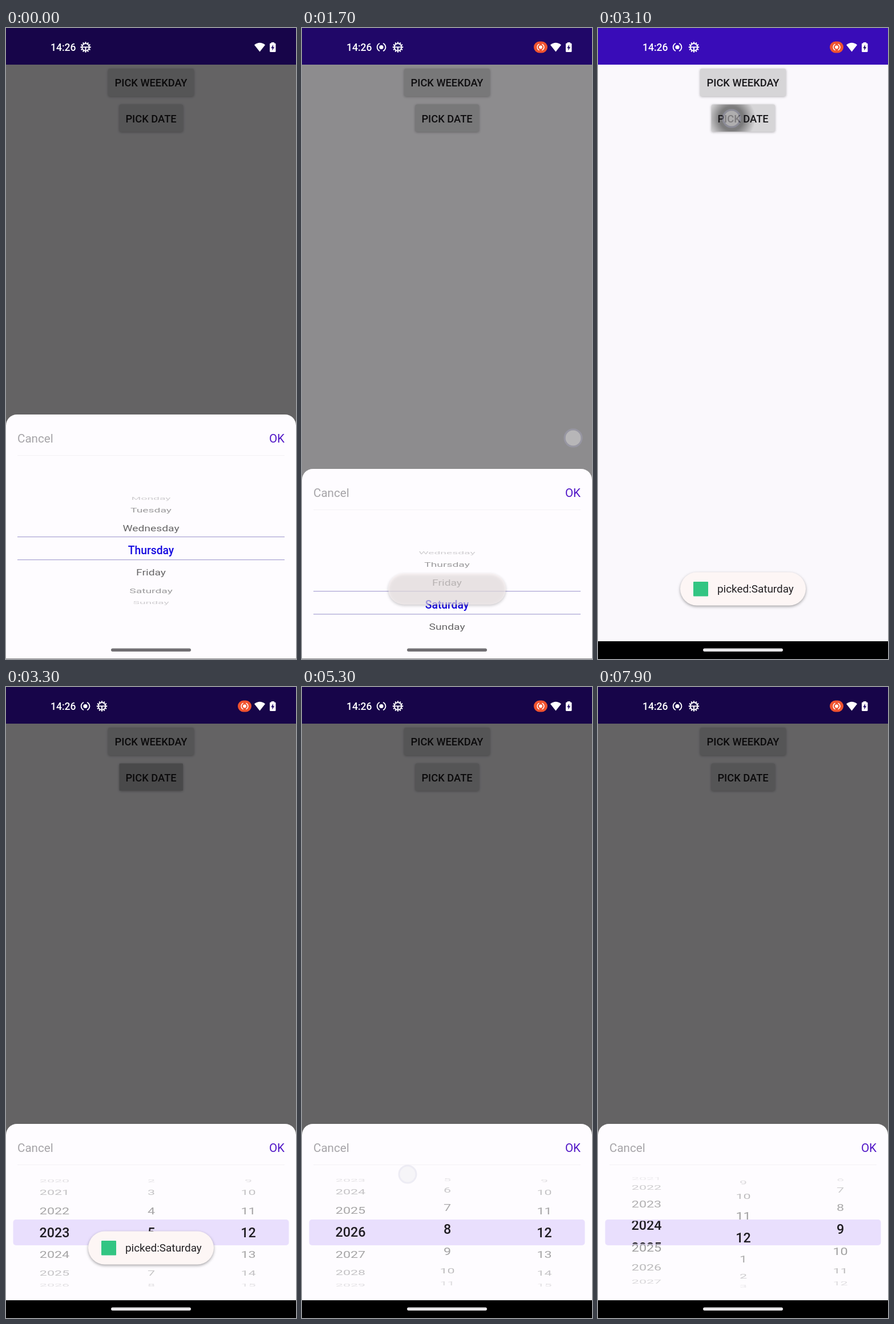
These frames come from a looping animation (508x1102 px, 8 s). An HTML page with a canvas:

```html
<!DOCTYPE html>
<html lang="en">
<head>
<meta charset="utf-8">
<title>Wheel pickers</title>
<style>
  html, body { margin: 0; width: 100%; height: 100%; overflow: hidden; background: #000; }
  canvas { display: block; width: 508px; height: 1102px; }
</style>
</head>
<body>
<canvas id="stage"></canvas>
<script>
const W = 508, H = 1102, LOOP = 8000, STEP = 100, NAV = 1071;
const canvas = document.getElementById('stage');
const ctx = canvas.getContext('2d');
const ratio = window.devicePixelRatio || 1;
canvas.width = W * ratio;
canvas.height = H * ratio;

const DAYS = ['Monday', 'Tuesday', 'Wednesday', 'Thursday', 'Friday', 'Saturday', 'Sunday'];
const TURN = 23.3 * Math.PI / 180, RADIUS = 97;

// Each track is a list of [time, value]
const tracks = {
  weekday: [[0, 3], [100, 3.1], [200, 3.6], [300, 4.2], [400, 4.6], [500, 4.85], [600, 4.95], [800, 5]],
  weekSlide: [[1600, 0], [1700, 95], [1800, 260], [1900, 427]],
  dateSlide: [[3100, 308], [3200, 130], [3300, 0]],
  dim: [[1600, .6], [1700, .44], [1800, .2], [1900, .06], [2000, 0], [3100, 0], [3200, .35], [3300, .6]],
  toast: [[1600, 0], [1700, .6], [1800, .92], [1900, 1], [3600, 1], [3800, 0]],
  ripple: [[2900, 0], [3000, .25], [3100, .42], [3200, .35], [3300, .14], [3500, 0]],
  rippleSize: [[2900, 10], [3000, 28], [3100, 42], [3200, 90], [3300, 200]],
  year: [[4200, 2023], [4300, 2023.4], [4500, 2025], [4700, 2025.8], [5000, 2026.02],
    [7300, 2026.02], [7500, 2025.4], [7700, 2024.7], [7900, 2024.33]],
  month: [[5000, 5], [5100, 5.6], [5200, 7], [5300, 8.15], [5500, 10.3], [5700, 11.6], [5900, 12],
    [6500, 12], [6600, 12.5], [6700, 13.6], [6800, 14.92], [7000, 18.2], [7200, 21.2], [7400, 23.1], [7600, 23.77]],
  day: [[5900, 12], [6000, 11.7], [6200, 10.3], [6400, 9.4], [6500, 9.15]]
};

// Taps and drags: down and up times, start and end points
const touches = [
  { t0: 100, t1: 400, from: [330, 960], to: [330, 885] },
  { t0: 1500, t1: 1700, from: [475, 716], to: [475, 716] },
  { t0: 2900, t1: 3100, from: [234, 158], to: [234, 158] },
  { t0: 4200, t1: 4500, from: [63, 1000], to: [66, 890] },
  { t0: 5000, t1: 5200, from: [200, 975], to: [185, 851] },
  { t0: 5900, t1: 6300, from: [440, 890], to: [436, 1000] },
  { t0: 6500, t1: 6700, from: [220, 975], to: [207, 873] },
  { t0: 7300, t1: 7500, from: [48, 890], to: [52, 950] }
];

function at(name, t) {
  const keys = tracks[name];
  if (t <= keys[0][0]) return keys[0][1];
  for (let i = 1; i < keys.length; i++) {
    const [a, va] = keys[i - 1], [b, vb] = keys[i];
    if (t <= b) return va + (vb - va) * (t - a) / (b - a);
  }
  return keys[keys.length - 1][1];
}

function scoped(draw) {
  ctx.save();
  draw();
  ctx.restore();
}

function box(x, y, w, h, r, color) {
  ctx.fillStyle = color;
  ctx.beginPath();
  ctx.roundRect(x, y, w, h, r);
  ctx.fill();
}

function disc(x, y, r, color) {
  ctx.fillStyle = color;
  ctx.beginPath();
  ctx.arc(x, y, r, 0, 7);
  ctx.fill();
}

function arc(x, y, r, a, b, color, width) {
  ctx.strokeStyle = color;
  ctx.lineWidth = width;
  ctx.beginPath();
  ctx.arc(x, y, r, a, b);
  ctx.stroke();
}

function text(str, x, y, size, color, weight = 400, align = 'left') {
  ctx.font = `${weight} ${size}px Roboto, sans-serif`;
  ctx.textAlign = align;
  ctx.fillStyle = color;
  ctx.fillText(str, x, y);
}

function shadow(blur, dy, color) {
  ctx.shadowBlur = blur * ratio;
  ctx.shadowOffsetY = dy * ratio;
  ctx.shadowColor = color;
}

function button(label, x, y, w, h) {
  scoped(() => {
    shadow(4, 1, 'rgba(0,0,0,.3)');
    box(x, y, w, h, 3, '#d6d5d7');
  });
  return () => text(label, 254, y + 31, 18.3, '#18171a', 500, 'center');
}

function page(t) {
  ctx.fillStyle = '#000';
  ctx.fillRect(0, 0, W, H);
  ctx.fillStyle = '#faf8fc';
  ctx.fillRect(0, 64, W, NAV - 64);
  ctx.fillStyle = '#390cb8';
  ctx.fillRect(0, 0, W, 64);
  button('PICK WEEKDAY', 179, 71, 150, 48)();
  const label = button('PICK DATE', 198.5, 133.5, 111.5, 47.5);
  const ink = at('ripple', t);
  if (ink > 0) scoped(() => {
    const r = at('rippleSize', t);
    const g = ctx.createRadialGradient(234, 158, 0, 234, 158, r);
    g.addColorStop(0, `rgba(0,0,0,${ink})`);
    g.addColorStop(.5, `rgba(0,0,0,${ink})`);
    g.addColorStop(1, 'rgba(0,0,0,0)');
    ctx.fillStyle = g;
    ctx.fillRect(198.5, 133.5, 111.5, 47.5);
  });
  label();
  ctx.fillStyle = `rgba(0,0,0,${at('dim', t)})`;
  ctx.fillRect(0, 0, W, NAV);
}

function sheet(top, height) {
  box(0, top, W, height + 20, [19, 19, 0, 0], '#fefcff');
  text('Cancel', 20, top + 48.5, 20.6, '#a6a4a8');
  text('OK', 488, top + 48.5, 20.6, '#4f14c6', 400, 'right');
  ctx.fillStyle = '#f3f1f5';
  ctx.fillRect(20, top + 71, 468, 1);
}

function wheel(x, cy, bandY, pos, label, look) {
  const row = (i, inside) => {
    const d = i - pos, far = Math.abs(d), str = label(i);
    if (!str) return;
    scoped(() => {
      ctx.beginPath();
      if (inside) ctx.rect(0, bandY, W, 40);
      else {
        ctx.rect(0, bandY - 98, W, 98);
        ctx.rect(0, bandY + 40, W, 98);
      }
      ctx.clip();
      ctx.translate(x, cy + RADIUS * Math.sin(d * TURN));
      if (!inside) {
        ctx.scale(1, .94 - .2 * far);
        ctx.globalAlpha = 1 - far / 3.9;
      }
      text(str, 0, look.size * .355, look.size, inside ? look.on : look.off, inside ? 500 : 400, 'center');
    });
  };
  for (let i = Math.ceil(pos - 3.4); i <= pos + 3.4; i++) {
    row(i, false);
    if (Math.abs(i - pos) < 1) row(i, true);
  }
}

function weekdaySheet(t) {
  const top = 675 + at('weekSlide', t);
  sheet(top, 427);
  wheel(254, top + 237.5, top + 213.5, at('weekday', t), i => DAYS[i],
    { size: 19.3, on: '#1408e0', off: '#333' });
  ctx.fillStyle = '#aea9d6';
  ctx.fillRect(20, top + 213, 468, 1.3);
  ctx.fillRect(20, top + 253, 468, 1.3);
  ctx.fillStyle = '#8a888c';
  ctx.fillRect(0, H - 1, W, 1);
}

function dateSheet(t) {
  const top = 763 + at('dateSlide', t), cy = top + 190, band = top + 169.5;
  const look = { size: 23.3, on: '#1f1d22', off: '#888' };
  scoped(() => {
    ctx.beginPath();
    ctx.rect(0, 0, W, NAV);
    ctx.clip();
    sheet(top, 308);
    box(12.5, top + 167, 483, 45, 5, '#e9dffd');
    wheel(85, cy, band, at('year', t), String, look);
    wheel(254.5, cy, band, at('month', t), i => String((i - 1) % 12 + 1), look);
    wheel(424.5, cy, band, at('day', t), String, look);
  });
}

function toast(t) {
  const show = at('toast', t);
  if (show <= 0) return;
  const entering = t < 1800;
  scoped(() => {
    const s = t < 3000 ? .84 + .16 * show : 1;
    ctx.translate(254, 979.5);
    ctx.scale(s, s);
    ctx.globalAlpha = show;
    scoped(() => {
      shadow(5, 2, 'rgba(0,0,0,.35)');
      box(-110, -29, 220, 58, 29, '#fdf6f5');
    });
    if (entering) return;
    box(-87, -12.5, 26, 25.5, 1, '#32c583');
    text('picked:Saturday', -45, 6.5, 18.9, '#232124');
  });
}

function recordIcon(x, y, k) {
  disc(x, y, 3.6 * k, '#fff');
  for (const a of [0, Math.PI]) arc(x, y, 7.4 * k, a - 1.15, a + 1.15, '#fff', 1.9 * k);
}

function gearIcon(x, y) {
  scoped(() => {
    ctx.translate(x, y);
    arc(0, 0, 6.3, 0, 7, '#fff', 1.8);
    ctx.fillStyle = '#fff';
    ctx.fillRect(-6, -1, 12, 1.8);
    ctx.fillRect(-1, 0, 2, 6);
    for (let i = 0; i < 12; i++) {
      ctx.rotate(Math.PI / 6);
      ctx.fillRect(-1.1, -9.2, 2.2, 3);
    }
  });
}

function statusBar(t) {
  const recording = t >= 100;
  text('14:26', 78, 39.7, 17.5, '#fff', 500);
  gearIcon(recording ? 168 : 139.5, 33.5);
  if (recording) {
    recordIcon(139, 33.5, 1);
    box(406, 23.5, 24, 20, 10, '#f0532f');
    recordIcon(418, 33.5, .8);
  }
  ctx.fillStyle = '#fff';
  ctx.beginPath();
  ctx.moveTo(444.5, 41.5);
  ctx.lineTo(435, 29.5);
  ctx.quadraticCurveTo(444.5, 22, 454, 29.5);
  ctx.fill();
  box(462, 26.5, 10.5, 15.5, 1.5, '#fff');
  box(464.8, 25, 5, 3, .5, '#fff');
  ctx.fillStyle = '#25106a';
  ctx.beginPath();
  [[468, 29], [464.3, 35.2], [466.6, 35.2], [466.2, 39.6], [470.2, 33.2], [467.8, 33.2]]
    .forEach(p => ctx.lineTo(...p));
  ctx.fill();
}

function touchDot(t) {
  for (const { t0, t1, from, to } of touches) {
    if (t < t0 || t >= t1 + 200) continue;
    const p = Math.min(1, (t - t0) / (t1 - t0));
    const x = from[0] + (to[0] - from[0]) * p;
    const y = from[1] + (to[1] - from[1]) * p;
    scoped(() => {
      ctx.globalAlpha = t <= t1 ? 1 : .5;
      disc(x, y, 13.5, 'rgba(225,224,226,.5)');
      arc(x, y, 15, 0, 7, 'rgba(165,165,195,.38)', 3);
    });
  }
}

function draw(t) {
  ctx.setTransform(ratio, 0, 0, ratio, 0, 0);
  page(t);
  const weekOpen = t < 1900;
  if (weekOpen) weekdaySheet(t);
  if (t > 3100) dateSheet(t);
  toast(t);
  statusBar(t);
  box(184, 1083.5, 140, 5.5, 2.75, weekOpen ? '#716f73' : '#e6e5e7');
  touchDot(t);
}

const start = performance.now();
function tick() {
  const t = (performance.now() - start) % LOOP;
  draw(Math.floor(t / STEP) * STEP);
  requestAnimationFrame(tick);
}
tick();
</script>
</body>
</html>
```
